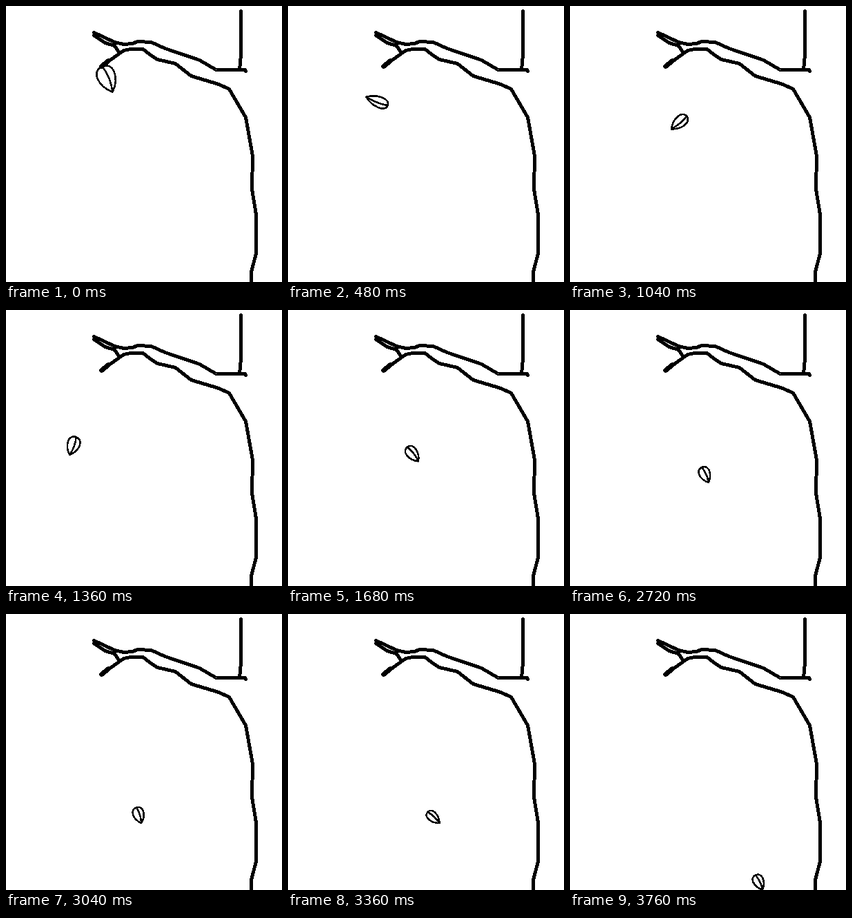
These frames come from a looping animation (400 by 400 pixels, 3.84 s). An HTML page:

```html
<!DOCTYPE html>
<html lang="en">
<head>
<meta charset="utf-8">
<title>Falling leaf</title>
<style>
html, body { margin: 0; height: 100%; overflow: hidden; background: #fff; }
svg { display: block; width: 100vw; height: 100vh; }
path { fill: none; stroke: #000; stroke-linecap: round; stroke-linejoin: round; shape-rendering: crispEdges; }
#tree { stroke-width: 5; }
#leaf { stroke-width: 2.6; }
</style>
</head>
<body>
<svg viewBox="0 0 400 400">
  <g id="tree" transform="translate(.5 .5)">
    <path d="M340 7V70L338 92"/>
    <path d="M127 38 157 52 170 55 183 54 190 51 210 52 230 61 280 78 304 92H346L347 94"/>
    <path d="M127 42 143 53 157 57 163 66"/>
    <path d="M138 87 170 64 180 62H198L211 72 219 77 245 83 268 101 308 113 323 120 347 161 357 217 356 265 362 302V358L355 385V400"/>
    <path d="M138 87 148 79" stroke-width="7"/>
  </g>
  <path id="leaf"/>
</svg>
<script>
// Turning points of the fall: time, x, y, heading of the tip in degrees
const keys = [
  [0, 147, 106, 68],
  [320, 114, 127, 155],
  [480, 129, 138, 202],
  [880, 174, 150, 165],
  [1040, 158, 169, 140],
  [1360, 97, 197, 110],
  [1680, 181, 209, 52],
  [2000, 209, 198, 20],
  [2240, 206, 199, 38],
  [2400, 206, 199, 38],
  [2560, 214, 214, 55],
  [2720, 196, 239, 66],
  [2960, 188, 291, 80],
  [3360, 211, 295, 43],
  [3760, 274, 389, 64]
];
const leaf = document.getElementById("leaf");
const step = 80, loop = 3840;

// Rounded behind, pointed in front, with a bent vein
function leafPath(length, width) {
  const l = length / 2, w = width * 0.75;
  return `M${l} 0C${l * 0.2} ${-w} ${-l} ${-w} ${-l} 0S${l * 0.2} ${w} ${l} 0Q0 ${-w * 0.3} ${-l} 0`;
}

function draw() {
  const t = Math.floor((performance.now() - start) % loop / step) * step;
  const i = Math.max(1, keys.findIndex(k => k[0] >= t));
  const a = keys[i - 1], b = keys[i];
  const u = (t - a[0]) / (b[0] - a[0]);
  const [, x, y, heading] = a.map((v, n) => v + (b[n] - v) * u);

  // The leaf recedes as it falls and looks narrower when it lies flat
  const length = 23 + 17 * Math.exp(-t / 1000);
  const width = length * (0.3 + 0.3 * Math.abs(Math.sin(heading * Math.PI / 180)));
  leaf.setAttribute("d", leafPath(length, width));
  leaf.setAttribute("transform", `translate(${x} ${y}) rotate(${heading})`);
  requestAnimationFrame(draw);
}

const start = performance.now();
draw();
</script>
</body>
</html>
```
